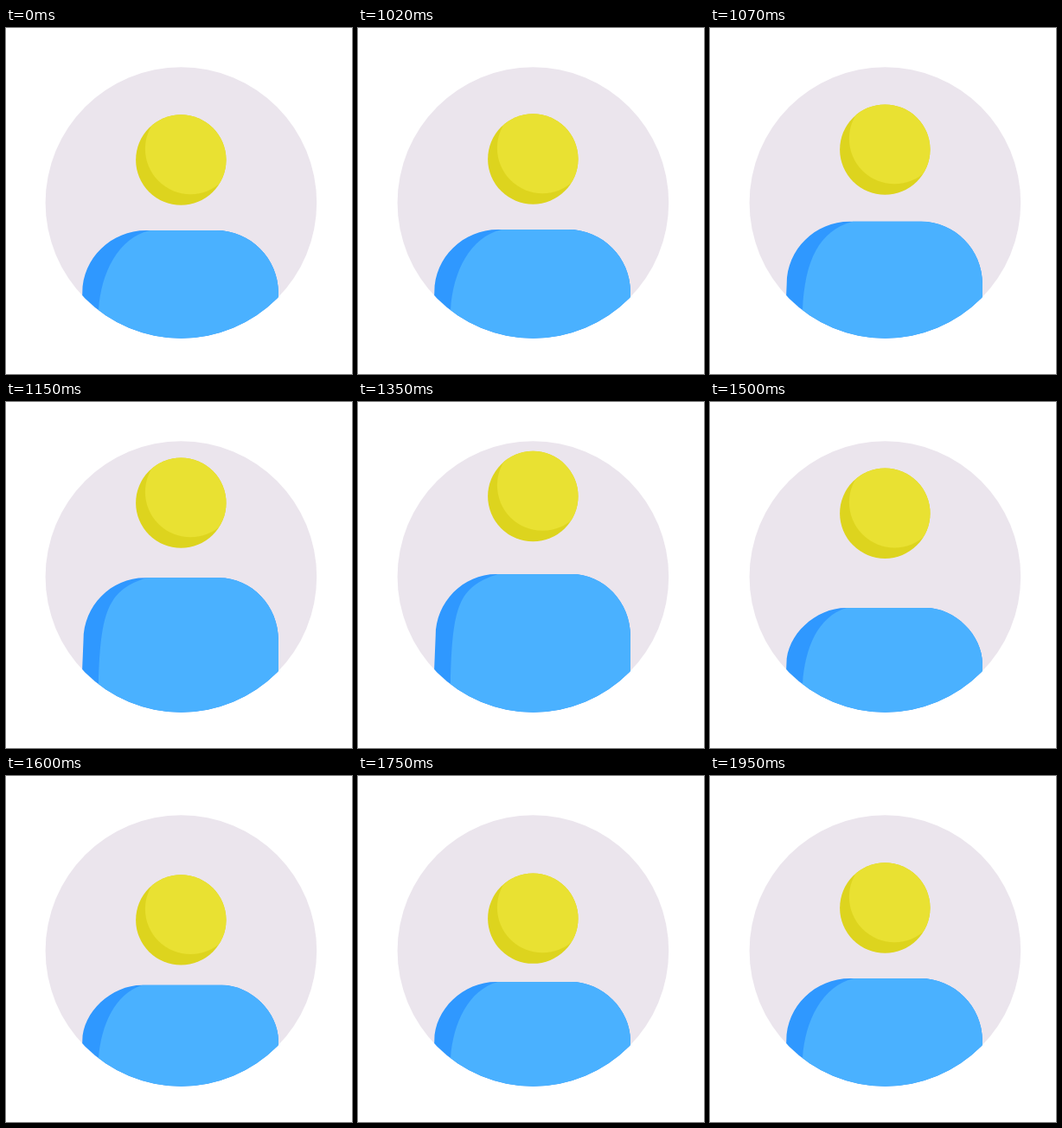
These frames come from a looping animation (400 by 400 pixels, 1970 ms). An HTML page with a canvas:

```html
<!DOCTYPE html>
<html lang="en">
<head>
<meta charset="utf-8">
<title>Avatar bounce</title>
<style>
html, body { margin: 0; width: 100%; height: 100%; overflow: hidden; background: #fff; }
canvas { display: block; width: 400px; height: 400px; }
</style>
</head>
<body>
<canvas id="stage" width="400" height="400"></canvas>
<script>
const ctx = document.getElementById('stage').getContext('2d');
const LOOP = 1970, STEP = 25;

// Cubic timing curve through (x1, 0) and (x2, 1), solved by bisection
function ease(p, x1, x2) {
  let lo = 0, hi = 1;
  for (let i = 0; i < 30; i++) {
    const u = (lo + hi) / 2, v = 1 - u;
    if (3 * x1 * u * v * v + 3 * x2 * u * u * v + u * u * u < p) lo = u;
    else hi = u;
  }
  return lo * lo * (3 - 2 * lo);
}

// Body poses: outline of the torso and the edge of its shaded side
const rest = {
  top: 234, left: 162, right: 243, sideX: 88.3, sideY: 306, k: 0.55,
  shade: 166, ax: 130, ay: 243, bx: 110, by: 282
};
const tall = {
  top: 196, left: 160, right: 247, sideX: 89.8, sideY: 268, k: 0.55,
  shade: 162, ax: 115, ay: 211, bx: 109, by: 233
};
const squat = {
  top: 242, left: 157, right: 250, sideX: 88.3, sideY: 306, k: 0.51,
  shade: 157, ax: 126, ay: 252, bx: 110, by: 288
};

// Each move: start, end, from, to, x1, x2
const bodyMoves = [
  [1000, 1250, rest, tall, 0.4, 0.36],
  [1250, 1550, tall, squat, 0.885, 0.58],
  [1550, 1950, squat, rest, 0.33, 0.67]
];
const headMoves = [
  [1000, 1250, { y: 152.5 }, { y: 108.3 }, 0.4, 0.36],
  [1300, 1640, { y: 108.3 }, { y: 169.6 }, 0.8, 0.66],
  [1640, 1950, { y: 169.6 }, { y: 152.5 }, 0.33, 0.67]
];

function pose(moves, t) {
  let move = moves[0];
  for (const m of moves) if (t >= m[0]) move = m;
  const [start, end, from, to, x1, x2] = move;
  const p = Math.min(1, Math.max(0, (t - start) / (end - start)));
  const e = p === 0 || p === 1 ? p : ease(p, x1, x2);
  const out = {};
  for (const key in from) out[key] = from[key] + (to[key] - from[key]) * e;
  return out;
}

function disc(x, y, r) {
  ctx.beginPath();
  ctx.arc(x, y, r, 0, Math.PI * 2);
}

function paint(color) {
  ctx.fillStyle = color;
  ctx.fill();
}

function torso(b) {
  const right = 315, bottom = 365, q = 1 - b.k;
  const rise = (b.sideY - b.top) * q;
  ctx.beginPath();
  ctx.moveTo(88, bottom);
  ctx.lineTo(88, 312);
  ctx.lineTo(b.sideX, b.sideY);
  ctx.bezierCurveTo(b.sideX, b.top + rise, b.sideX + (b.left - b.sideX) * q, b.top, b.left, b.top);
  ctx.lineTo(b.right, b.top);
  ctx.bezierCurveTo(right - (right - b.right) * q, b.top, right, b.top + rise, right, b.sideY);
  ctx.lineTo(right, bottom);
  ctx.closePath();
}

function drawBody(b) {
  ctx.save();
  disc(202.4, 202, 156.8);
  ctx.clip();
  torso(b);
  paint('#2f98ff');
  ctx.clip();
  ctx.beginPath();
  ctx.moveTo(b.shade, b.top - 1);
  ctx.lineTo(b.shade, b.top);
  ctx.bezierCurveTo(b.ax, b.ay, b.bx, b.by, 107, 326);
  ctx.lineTo(106, 365);
  ctx.lineTo(320, 365);
  ctx.lineTo(320, b.top - 1);
  ctx.closePath();
  paint('#4ab1ff');
  ctx.restore();
}

function drawHead(y) {
  ctx.save();
  disc(202.3, y, 52.2);
  paint('#ddd41e');
  ctx.clip();
  disc(213.3, y - 12.7, 52.4);
  paint('#e9e132');
  ctx.restore();
}

function draw(t) {
  ctx.fillStyle = '#fff';
  ctx.fillRect(0, 0, 400, 400);
  disc(202.4, 202, 156.8);
  paint('#ebe5ed');
  drawBody(pose(bodyMoves, t));
  drawHead(pose(headMoves, t).y);
}

// Steps of 25 ms, shown on whole hundredths of a second
function stepTime(t) {
  const k = Math.floor(t / STEP);
  const next = Math.floor((k + 1) * STEP / 10) * 10;
  return (t >= next ? k + 1 : k) * STEP;
}

const begin = performance.now();
function tick() {
  draw(stepTime((performance.now() - begin) % LOOP));
  requestAnimationFrame(tick);
}
tick();
</script>
</body>
</html>
```
